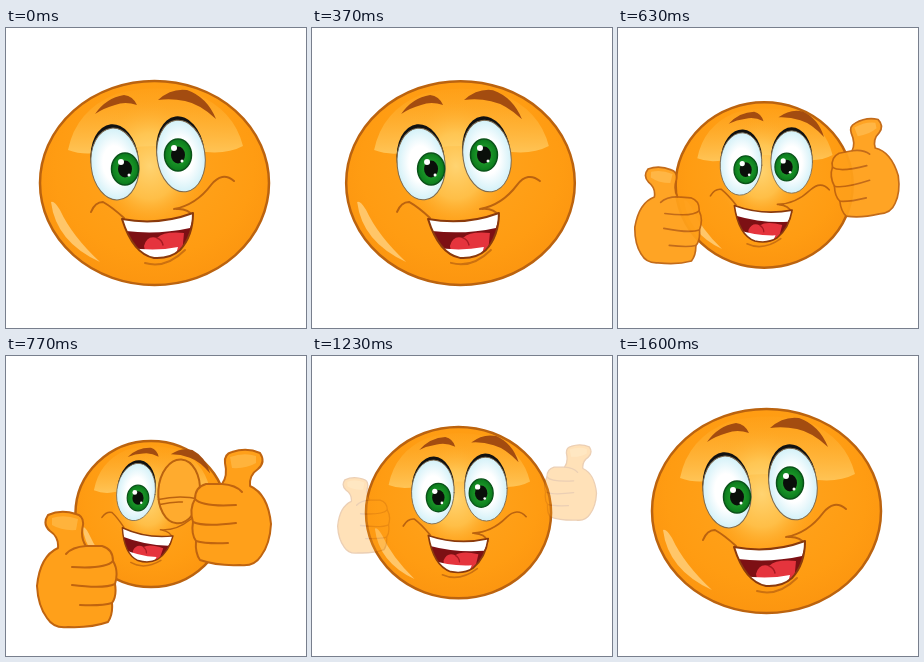
An HTML page that plays this animation: 300x300 px, repeating every 2000 ms.

```html
<!DOCTYPE html>
<html lang="en">
<head>
<meta charset="utf-8">
<title>Thumbs up</title>
<style>
  html, body { margin: 0; width: 100%; height: 100%; overflow: hidden; background: #fff; }
  svg { display: block; width: 100vw; height: 100vh; }
</style>
</head>
<body>
<svg viewBox="0 0 300 300" fill="none" stroke-linecap="round" stroke-linejoin="round">
  <defs>
    <radialGradient id="skin" cx=".5" cy=".42" r=".62">
      <stop offset="0" stop-color="#ffa51f"/>
      <stop offset=".7" stop-color="#ff9c12"/>
      <stop offset="1" stop-color="#fb940f"/>
    </radialGradient>
    <linearGradient id="gloss" x2="0" y2="1">
      <stop offset="0" stop-color="#ffb536" stop-opacity=".1"/>
      <stop offset="1" stop-color="#ffcb62" stop-opacity=".85"/>
    </linearGradient>
    <radialGradient id="glow">
      <stop offset="0" stop-color="#ffdc80"/>
      <stop offset=".5" stop-color="#ffcc5c" stop-opacity=".8"/>
      <stop offset="1" stop-color="#ffa51f" stop-opacity="0"/>
    </radialGradient>
    <radialGradient id="white">
      <stop offset=".5" stop-color="#fff"/>
      <stop offset="1" stop-color="#d3f1f8"/>
    </radialGradient>
    <radialGradient id="green">
      <stop offset=".4" stop-color="#1f9a2a"/>
      <stop offset="1" stop-color="#0a7a1c"/>
    </radialGradient>
    <path id="lips" d="M116 191Q152 198 187 185Q187 208 174 222Q164 231 148 230Q127 226 116 191Z"/>
    <clipPath id="mouthClip"><use href="#lips"/></clipPath>
    <clipPath id="lidClip"><rect id="lidRect" x="140" y="82" width="72" height="0"/></clipPath>

    <g id="eye">
      <ellipse cy="-4" rx="24" ry="36" fill="#111"/>
      <ellipse rx="24" ry="36" fill="url(#white)" stroke="#7d6a50"/>
    </g>
    <g id="iris">
      <ellipse rx="13.5" ry="16" fill="url(#green)" stroke="#0a5219" stroke-width="1.5"/>
      <ellipse rx="7" ry="8.5" fill="#0a0f0a"/>
      <circle cx="-4" cy="-7" r="3" fill="#fff"/>
      <circle cx="4" cy="6" r="1.5" fill="#fff"/>
    </g>
    <g id="hand" stroke="#c0640f" stroke-width="2">
      <path fill="#ffa01a" d="M52 192Q34 200 31 230Q32 250 41 262Q48 273 62 271Q85 272 102 266Q107 259 106 247Q111 240 109 228Q113 215 107 205Q107 193 96 190L80 190Q74 182 77 169Q78 160 70 158Q55 153 42 159Q36 168 44 175Q53 181 52 192Z"/>
      <path stroke="none" fill="#ffb845" opacity=".8" d="M46 162Q58 158 72 163L70 174Q56 175 46 169Z"/>
      <path d="M80 190Q66 191 60 198M107 205Q100 213 66 211M109 228Q98 233 66 229M106 247Q96 250 74 249"/>
    </g>
  </defs>

  <g id="head">
    <ellipse cx="148.5" cy="155" rx="114.5" ry="102" fill="url(#skin)" stroke="#bb630f" stroke-width="2.5" vector-effect="non-scaling-stroke"/>
    <path fill="url(#gloss)" d="M62 122Q70 82 110 66Q150 55 190 66Q228 82 237 118Q222 126 200 124Q150 112 96 124Q78 128 62 122Z"/>
    <path fill="#ffce78" opacity=".85" d="M45 174Q50 214 94 234Q66 208 54 182Q48 172 45 174Z"/>
    <ellipse cx="144" cy="138" rx="56" ry="66" fill="url(#glow)" opacity=".85"/>
  </g>

  <use id="leftEye" href="#eye" transform="rotate(-6)"/>
  <use id="rightEye" href="#eye"/>
  <use id="leftIris" href="#iris"/>
  <use id="rightIris" href="#iris"/>

  <g id="lid">
    <g clip-path="url(#lidClip)" transform="translate(-175 -128)">
      <ellipse cx="175" cy="126" rx="26" ry="40" fill="#ffab2e" stroke="#bb630f" stroke-width="2.5"/>
      <path d="M150 138Q176 130 201 134M152 144Q168 139 180 139" stroke="#bb630f" stroke-width="2"/>
    </g>
  </g>

  <g id="leftBrow" fill="#a34c10">
    <path transform="translate(-110 -76)" d="M89 86Q100 70 118 67Q127 68 131 77Q119 73 109 77Q98 80 89 86Z"/>
  </g>
  <g id="rightBrow" fill="#a34c10">
    <path transform="translate(-181 -76)" d="M152 72Q165 60 181 62Q201 69 210 91Q194 76 179 73Q165 70 152 72Z"/>
  </g>

  <g id="mouth">
    <g transform="translate(-151 -207)">
      <g stroke="#bb630f" stroke-width="2">
        <path d="M85 184Q89 174 97 174Q106 179 118 190"/>
        <path d="M168 181Q190 177 205 157Q216 143 228 153M170 181Q182 180 187 188"/>
        <path d="M139 235Q160 241 179 222" opacity=".75"/>
      </g>
      <g clip-path="url(#mouthClip)">
        <rect x="110" y="180" width="80" height="54" fill="#7d1014"/>
        <path fill="#e5343d" d="M138 218Q141 207 151 210Q158 203 178 205L176 226L140 228Z"/>
        <path d="M151 210Q156 212 157 217" stroke="#a81a22" stroke-width="1.5"/>
        <path fill="#fff" d="M112 186L190 180L184 200Q152 207 120 203Z"/>
        <path fill="#fff" d="M122 219Q146 224 172 219L168 234H126Z"/>
      </g>
      <use href="#lips" stroke="#8a3a0c" stroke-width="2"/>
    </g>
  </g>

  <g id="leftHand"><use href="#hand" transform="translate(-70 -214)"/></g>
  <g id="rightHand"><use href="#hand" transform="translate(-70 -214)"/></g>
</svg>
<script>
const LOOP = 2000, FPS = 30;
const $ = id => document.getElementById(id);
const move = (id, transform) => $(id).setAttribute('transform', transform);
const mix = (a, b, p) => a + (b - a) * p;
const ramp = (t, from, to) => Math.min(1, Math.max(0, (t - from) / (to - from)));
const curve = (a, b, c, u) => mix(mix(a, b, u), mix(b, c, u), u);

// Each part slides from its open pose to its wink pose.
const parts = {
  leftEye:   { from: [109, 136], to: [130, 136], scale: .8, tilt: -6, turn: 14 },
  rightEye:  { from: [175, 128], to: [173, 137], scale: .8, tilt: -8, turn: 12 },
  leftIris:  { from: [119, 141], to: [132, 142], scale: .8 },
  rightIris: { from: [172, 127], to: [167, 145], scale: .8 },
  lid:       { from: [175, 128], to: [173, 137], scale: .8, tilt: -8, turn: 12 },
  leftBrow:  { from: [110, 76], to: [138, 97], scale: .72, turn: 12 },
  rightBrow: { from: [181, 76], to: [185, 104], scale: .72, turn: 8 },
  mouth:     { from: [151, 207], to: [138, 189], scale: .72, turn: 14 }
};

// Hands fly in from `enter`, stop at `hold`, and bend past `bend` to `leave`.
const hands = {
  leftHand:  { enter: [15, 143], hold: [70, 214], bend: [27, 221], leave: [60, 133], spin: 11, flip: 1 },
  rightHand: { enter: [281, 121], hold: [226, 152], bend: [240, 144], leave: [268, 119], spin: -30, flip: -1 }
};

// 0 is the open face, 1 the wink; it swells below 0 first.
function winkAt(step) {
  const swell = -.41;
  if (step < 6) return swell * step / 6;
  return step < 28 ? mix(swell, 1, ramp(step, 6, 23)) : 1 - ramp(step, 28.5, 48);
}

function drawPart(id, p) {
  const { from, to, scale, tilt = 0, turn = 0 } = parts[id];
  const [x, y] = from.map((v, i) => mix(v, to[i], p));
  move(id, `translate(${x} ${y}) rotate(${tilt + turn * p}) scale(${mix(1, scale, p)})`);
}

function drawHand(id, step) {
  const { enter, hold, bend, leave, spin, flip } = hands[id];
  const come = ramp(step, 12, 23), go = ramp(step, 27, 39);
  const [x, y] = hold.map((v, i) =>
    go ? curve(v, bend[i], leave[i], go) : mix(enter[i], v, come));
  const size = mix(.53, 1, come) - go * go / 2;
  move(id, `translate(${x} ${y}) rotate(${spin * (1 - come)}) scale(${size * flip} ${size})`);
  $(id).setAttribute('opacity', Math.min(1, come * 1.5) - go * go);
}

function draw(time) {
  const step = Math.floor((time % LOOP + 3.5) * FPS / 1000);
  const p = winkAt(step);
  move('head', `translate(${148.5 - 3.5 * p} ${155 + 3 * p}) scale(${1 - .34 * p} ${1 - .284 * p}) translate(-148.5 -155)`);
  Object.keys(parts).forEach(id => drawPart(id, p));
  const shut = ramp(step, 19, 22) - ramp(step, 28, 31);
  $('lidRect').setAttribute('height', 90 * shut);
  Object.keys(hands).forEach(id => drawHand(id, step));
}

const start = performance.now();
function tick() {
  draw(performance.now() - start);
  requestAnimationFrame(tick);
}
tick();
</script>
</body>
</html>
```
